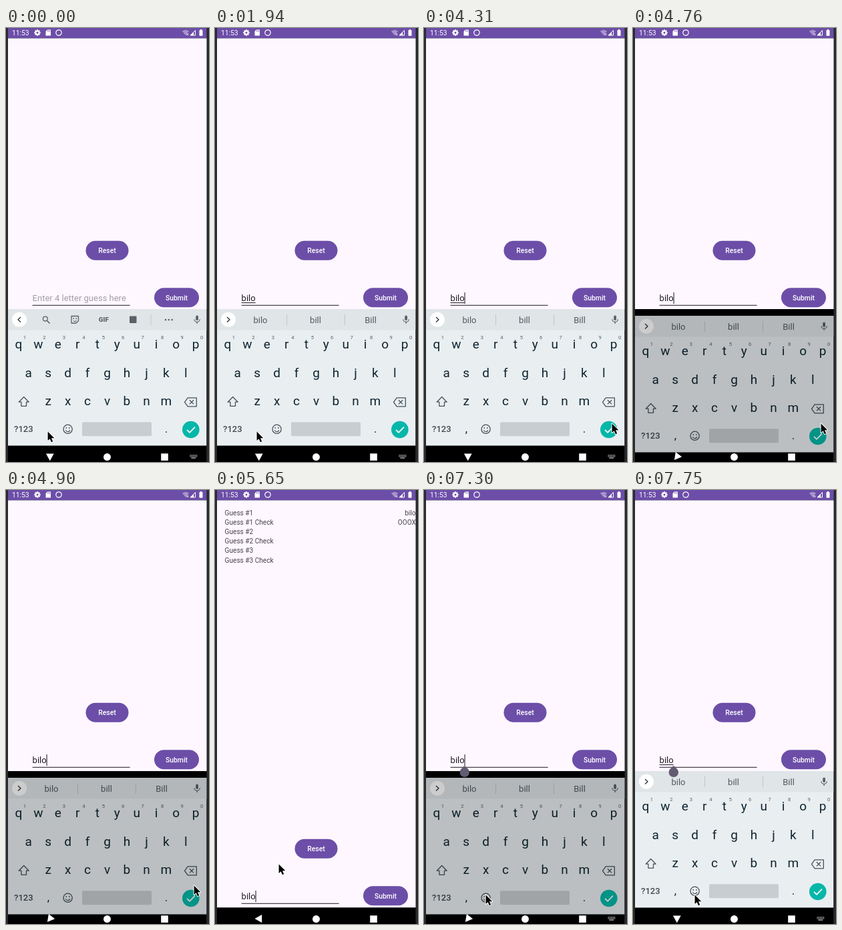
Recreate the animation shown at these times as an HTML page with a canvas. Size 304 by 650 pixels, loop 8 s.

```html
<!DOCTYPE html>
<html lang="en">
<head>
<meta charset="utf-8">
<title>Word guess screen</title>
<style>
html, body { margin: 0; width: 100%; height: 100%; overflow: hidden; background: #292a2d; }
canvas { display: block; width: 304px; height: 650px; }
</style>
</head>
<body>
<canvas id="stage"></canvas>
<script>
const W = 304, H = 650, LOOP = 8000, TICK = 148.9, BLINK = 577;
const LEFT = 3, WIDTH = 297.5, MID = 151.5;
const BAR = 15.5, KEYS_TOP = 421, NAV_TOP = 625.5, PAN = 204, PITCH = 29.45;
const PURPLE = '#6c4ea8', PAGE = '#fef7ff', INK = '#0f2530', GREY = '#586268';
const ICON = '#46535a', BODY = '#49454f', DARK = '#1d1b20', WHITE = '#fff';

const TYPED = 13, PRESS = 21, CLOSE = 32, TAP = 48, OPEN = 49;
const FIELD = { x: 39.6, y: 613.3, size: 13 };
const WORDS = {
  b: ['b', 'be', 'but'], bi: ['bi', 'big', 'bit'],
  bil: ['bil', 'bill', 'Bill'], bilo: ['bilo', 'bill', 'Bill']
};
const MOVES = [
  { from: 14, to: 20, x: 262, y: 404 },
  { from: 22, to: 25, x: 283, y: 622 },
  { from: 25, to: 27, x: 281, y: 592 },
  { from: 35.5, to: 38, x: 95, y: 560 },
  { from: 41, to: 45, x: 92, y: 606 }
];

const canvas = document.getElementById('stage');
const dpr = window.devicePixelRatio || 1;
canvas.width = W * dpr;
canvas.height = H * dpr;
const c = canvas.getContext('2d');
c.scale(dpr, dpr);

function text(s, x, y, size, color, align = 'left', weight = 400) {
  c.font = `${weight} ${size}px Roboto, sans-serif`;
  c.textAlign = align;
  c.fillStyle = color;
  c.fillText(s, x, y);
}
function rect(x, y, w, h, color, r = 0) {
  c.fillStyle = color;
  c.beginPath();
  c.roundRect(x, y, w, h, r);
  c.fill();
}
function disc(x, y, r, color) {
  c.fillStyle = color;
  c.beginPath();
  c.arc(x, y, r, 0, 7);
  c.fill();
}
function arc(x, y, r, color, lw, from = 0, to = 7) {
  c.strokeStyle = color;
  c.lineWidth = lw;
  c.beginPath();
  c.arc(x, y, r, from, to);
  c.stroke();
}
function trace(points, close) {
  c.beginPath();
  points.forEach(([x, y]) => c.lineTo(x, y));
  if (close) c.closePath();
}
function line(points, color, lw, close = false) {
  c.strokeStyle = color;
  c.lineWidth = lw;
  trace(points, close);
  c.stroke();
}
function poly(points, color) {
  c.fillStyle = color;
  trace(points, true);
  c.fill();
}
function cross(x, y, r, color, lw) {
  line([[x - r, y - r], [x + r, y + r]], color, lw);
  line([[x + r, y - r], [x - r, y + r]], color, lw);
}
function at(x, y, draw) {
  c.save();
  c.translate(x, y);
  draw();
  c.restore();
}
function clip(top, bottom, draw) {
  c.save();
  c.beginPath();
  c.rect(LEFT, top, WIDTH, bottom - top);
  c.clip();
  draw();
  c.restore();
}

function pointerAt(k) {
  return MOVES.reduce(([x, y], m) => {
    const p = Math.min(1, Math.max(0, (k - m.from) / (m.to - m.from)));
    const e = p * p * (3 - 2 * p);
    return [x + (m.x - x) * e, y + (m.y - y) * e];
  }, [62, 604]);
}

function caretOn(k) {
  if (k < TYPED) return k > 0;
  const since = k < TAP ? k * TICK - 1936 : (k - TAP) * TICK;
  return Math.floor(since / BLINK) % 2 === 0;
}

function stateAt(t) {
  const k = Math.floor((t + 9) / TICK);
  const open = k <= CLOSE || k >= OPEN;
  const sliding = k === CLOSE || k === OPEN;
  return {
    open,
    typed: 'bilo'.slice(0, Math.max(0, Math.floor((k - 1) / 3))),
    caret: caretOn(k),
    composing: k < CLOSE || k > OPEN,
    pressed: k === PRESS,
    drop: sliding ? 10 : 0,
    turn: sliding ? -52 : open ? -90 : 0,
    keysIcon: k < CLOSE || k >= TAP,
    handle: k < TAP ? 0 : k === TAP ? 0.3 : 1,
    pointer: pointerAt(k)
  };
}

function drawStatus() {
  rect(LEFT, 0, WIDTH, BAR, PURPLE);
  text('11:53', 9, 10.8, 10.3, WHITE);
  at(47, 7, () => {
    for (let i = 0; i < 8; i++) {
      c.rotate(Math.PI / 4);
      rect(-1.1, -4.7, 2.2, 2.5, WHITE);
    }
    arc(0, 0, 2.5, WHITE, 2);
  });
  poly([[62, 2.5], [67, 2.5], [67, 11.5], [59.5, 11.5], [59.5, 5]], WHITE);
  for (let i = 0; i < 3; i++) rect(62 + i * 1.7, 3.6, 0.8, 2, PURPLE);
  arc(79, 7, 4.2, WHITE, 1.2);
  c.globalAlpha = 0.4;
  poly([[263.8, 4.5], [269, 2.8], [274.2, 4.5], [269, 11]], WHITE);
  c.globalAlpha = 1;
  cross(271.8, 9.5, 1.5, WHITE, 0.9);
  line([[276, 11], [283.5, 11], [283.5, 3.5]], WHITE, 1, true);
  poly([[276, 11], [281, 11], [281, 6]], WHITE);
  rect(289.5, 3, 5, 8.8, WHITE, 0.8);
  rect(291, 2, 2, 1.5, WHITE);
}

function button(label, x, y, w, pressed) {
  rect(x, y, w, 29, PURPLE, 14.5);
  if (pressed) rect(x, y, w, 29, 'rgba(255,255,255,0.25)', 14.5);
  text(label, x + w / 2, y + 18.5, 10.4, WHITE, 'center', 500);
}

function drawField(s) {
  const { x, y, size } = FIELD;
  rect(x, 618.7, 146, 1.3, BODY);
  if (s.typed) text(s.typed, x, y, size, DARK);
  else text('Enter 4 letter guess here', x, y, size, '#a39ea6');
  const w = s.typed ? c.measureText(s.typed).width : 0;
  if (s.composing) rect(x, y + 1.7, w, 0.9, DARK);
  if (s.caret) rect(x + w - 0.2, 600, 1.3, 17, BODY);
}

function drawPage(s) {
  clip(BAR, s.open ? KEYS_TOP : NAV_TOP, () => {
    rect(0, 0, W, H, PAGE);
    if (s.open) c.translate(0, -PAN);
    for (let i = 0; i < 6; i++) {
      const label = `Guess #${(i >> 1) + 1}${i % 2 ? ' Check' : ''}`;
      text(label, 14.6, 38.2 + i * 14.07, 10.1, BODY);
    }
    text('bilo', 300.5, 38.2, 10.1, BODY, 'right');
    text('OOOX', 300.8, 52.3, 10.1, BODY, 'right');
    button('Reset', 119.5, 522.8, 64);
    button('Submit', 222, 593.2, 67, s.pressed);
    drawField(s);
  });
}

function face(x, y, gap, smile, color) {
  disc(x - gap, y - 1.8, 0.9, color);
  disc(x + gap, y - 1.8, 0.9, color);
  arc(x, y + 0.6, smile, color, 1.1, 0.2, Math.PI - 0.2);
}

function drawTools() {
  arc(58.8, 435.6, 3.4, GREY, 1.3);
  line([[61.3, 438.2], [65.5, 442.4]], GREY, 1.5);
  line([[98, 431.5], [108.5, 431.5], [108.5, 438.5], [105, 442], [98, 442]], GREY, 1.3, true);
  face(103.2, 437, 2, 2, GREY);
  text('GIF', 146.3, 440.2, 9.8, GREY, 'center', 900);
  rect(185, 431.5, 10.5, 10.5, GREY, 1);
  rect(216.5, 429, 1, 16, '#c3c9cc');
  for (let i = 0; i < 3; i++) disc(239 + i * 4.8, 437, 1.3, GREY);
}

function drawSuggestions(words) {
  words.forEach((word, i) => {
    text(word, 68 + i * 82.5, 441.6, 13, '#505b61', 'center');
    if (i) rect(20 + i * 87, 429, 1, 16, '#c0c7ca');
  });
}

function drawStrip(s) {
  rect(LEFT, KEYS_TOP, WIDTH, 31.5, '#e0e5e7');
  disc(20, 436.8, 11, WHITE);
  const d = s.typed ? 2 : -2;
  line([[20 - d, 433], [20 + d, 436.8], [20 - d, 440.6]], '#30393e', 1.4);
  if (s.typed) drawSuggestions(WORDS[s.typed]);
  else drawTools();
  rect(284.2, 430.5, 3.8, 7.5, GREY, 1.9);
  arc(286.1, 436.2, 4.2, GREY, 1.2, 0, Math.PI);
  rect(285.5, 440, 1.2, 3, GREY);
}

function drawLetters() {
  ['qwertyuiop', 'asdfghjkl', 'zxcvbnm'].forEach((row, r) => {
    const x = MID - (row.length - 1) / 2 * PITCH;
    [...row].forEach((ch, i) => {
      text(ch, x + i * PITCH, 480 + r * 42.6, 19, INK, 'center');
      if (r === 0) text((i + 1) % 10, x + 9 + i * PITCH, 466.2, 7.6, GREY, 'center');
    });
  });
}

function drawKeys(s) {
  rect(LEFT, KEYS_TOP, WIDTH, 229, '#e9eef1');
  drawStrip(s);
  drawLetters();
  at(26.7, 560.2, () => {
    const half = [[0, -7.7], [7.5, 0], [3.8, 0], [3.8, 6.1]];
    const mirror = half.map(([x, y]) => [-x, y]).reverse();
    line([...half, ...mirror], ICON, 1.3, true);
  });
  line([[267.5, 560.3], [272.2, 553.8], [285.3, 553.8], [285.3, 566.8], [272.2, 566.8]], ICON, 1.3, true);
  cross(278, 560.3, 3.1, ICON, 1.3);

  text('?123', 26.3, 605.4, 13, '#3f4b52', 'center', 500);
  text(',', 63.4, 606, 17, INK, 'center');
  arc(92.6, 600.8, 6.6, ICON, 1.3);
  face(92.6, 600.8, 2.3, 3.2, ICON);
  rect(114, 590.3, 104, 21, '#c8cdd1', 2);
  text('.', 240, 606, 17, INK, 'center');
  disc(276.8, 601.5, 12.8, '#04b7a9');
  line([[271, 601.8], [275, 605.8], [283, 597.6]], WHITE, 1.7);
}

function drawKeyboard(s) {
  clip(KEYS_TOP, H, () => {
    rect(0, 0, W, H, '#000');
    c.translate(0, s.drop);
    drawKeys(s);
    if (s.drop) rect(LEFT, KEYS_TOP, WIDTH, 229, 'rgba(0,0,0,0.2)');
  });
}

function drawNav(s) {
  const top = NAV_TOP + s.drop;
  rect(LEFT, top, WIDTH, H - top, '#000');
  at(65.8, 642, () => {
    c.rotate(s.turn * Math.PI / 180);
    poly([[-6.3, 0], [4.4, -5.9], [4.4, 5.9]], WHITE);
  });
  disc(MID, 642.6, 5.5, WHITE);
  rect(232.2, 637.3, 10.6, 10.6, WHITE);
  if (!s.keysIcon) return;
  for (let i = 0; i < 12; i++) rect(275.5 + i % 6 * 1.9, 639.3 + (i > 5) * 2, 1.2, 1.2, '#ccc');
  rect(277.4, 643.4, 6.8, 1.2, '#ccc');
}

function drawHandle(s) {
  c.globalAlpha = s.handle;
  at(60.8, s.open ? 422.8 : 626.8, () => {
    c.rotate(Math.PI / 4);
    rect(-7.2, -7.2, 14.4, 14.4, '#625b71', [2, 7.2, 7.2, 7.2]);
  });
  c.globalAlpha = 1;
}

function drawPointer([x, y]) {
  at(x + 0.6, y, () => {
    const arrow = [[0, 0.5], [0, 14], [3.1, 11.2], [5.3, 16.2], [7.6, 15.2], [5.4, 10.3], [9.7, 10.2]];
    line(arrow, WHITE, 2, true);
    poly(arrow, '#000');
  });
}

function draw(t) {
  const s = stateAt(t);
  rect(0, 0, W, H, '#292a2d');
  drawStatus();
  drawPage(s);
  if (s.open) drawKeyboard(s);
  drawNav(s);
  drawHandle(s);
  drawPointer(s.pointer);
}

c.lineJoin = 'round';
const start = performance.now();
function loop() {
  draw((performance.now() - start) % LOOP);
  requestAnimationFrame(loop);
}
loop();
</script>
</body>
</html>
```
